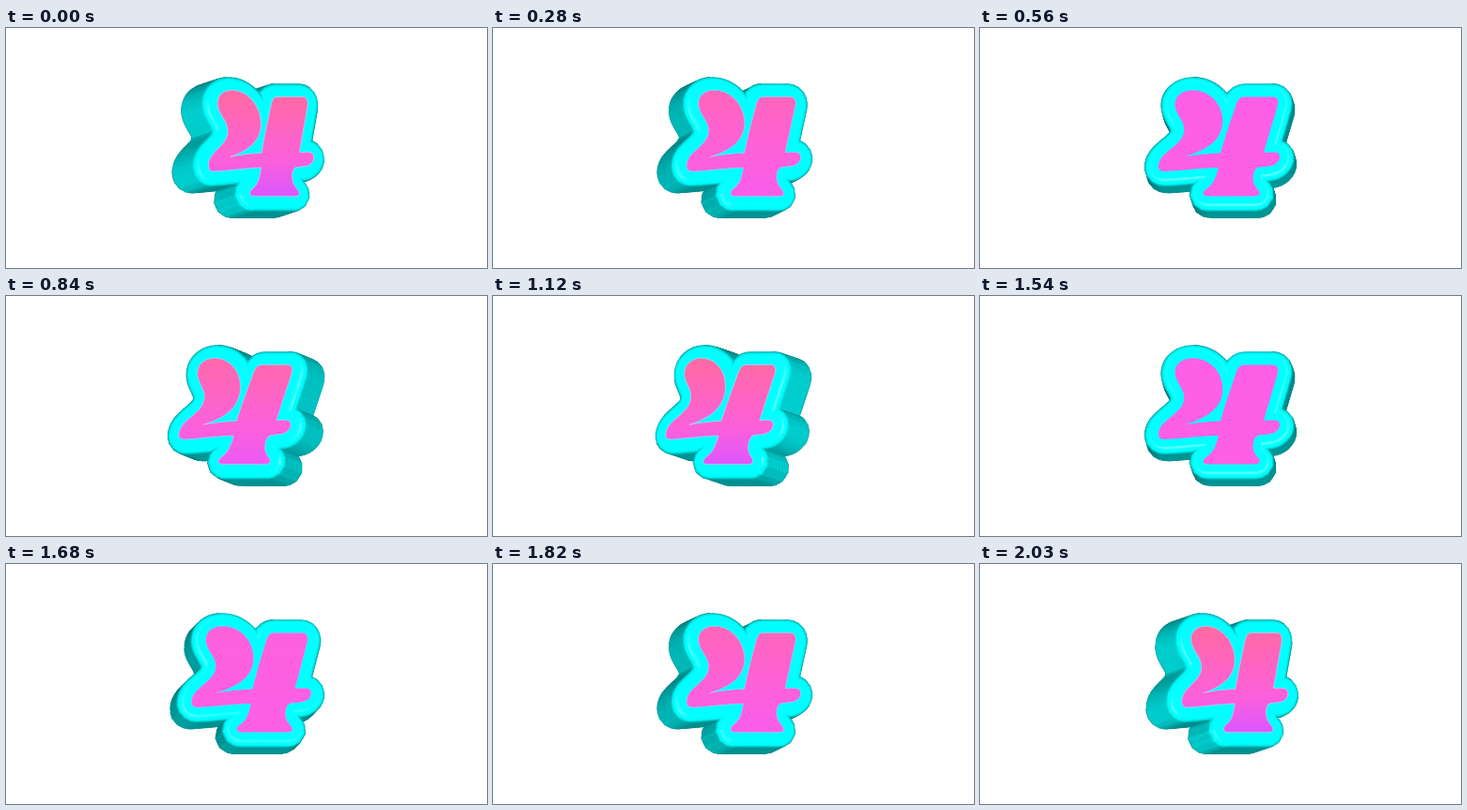
Write an HTML page with a canvas that moves like this. It is 512 by 256 pixels and loops after 2100 ms.

```html
<!DOCTYPE html>
<html lang="en">
<head>
<meta charset="utf-8">
<title>Swinging 4</title>
<style>
  html, body { margin: 0; width: 100%; height: 100%; overflow: hidden; background: #fff; }
  canvas { display: block; }
</style>
</head>
<body>
<canvas id="stage" width="512" height="256"></canvas>
<script>
const ctx = document.getElementById('stage').getContext('2d');
const LOOP = 2100, STEP = 70;
const SWING = 0.506;            // largest turn, radians
const TILT = 0.16;              // constant lean backwards
const CX = 256, CY = 127;
const FACE_Z = 29, BEVEL = 7, RIM = 8, SAMPLES = 360;
const sinT = Math.sin(TILT), cosT = Math.cos(TILT);

const GLYPH = `M226 67 C215 67 207 73 207 82 C207 92 217 99 217 109
  C217 120 207 126 199 133 C193 138 190 143 190 148 C190 152 192 153.5 197 153.5
  C212 153 235 150 254 149.5 C252 158 249 167 243 171 C240 173 238 175 238 177
  C238 179 240 180 243 180 H293 C297 180 298.5 178 298 176
  C297 173 292 170 291 163 C290.5 157 292 151 296 149.5
  C302 148 308 149 313 146.5 C318 144 320 140 319 136.5 C318 133 314 133 309 133
  L302 133.5 L316 85 C318 78 316 74 311 74 H282 C276 74 274 77 272 83
  C266 101 260 119 256 134 C242 134.5 230 136 217 138
  C238 132 258 122 258 100 C258 82 244 67 226 67 Z`;

// Centred outline points with outward normals
function sampleOutline() {
  const path = document.createElementNS('http://www.w3.org/2000/svg', 'path');
  path.setAttribute('d', GLYPH);
  const length = path.getTotalLength();
  const points = Array.from({ length: SAMPLES }, (_, i) => {
    const p = path.getPointAtLength(length * i / SAMPLES);
    return { x: p.x - 254.4, y: (p.y - 123) * 1.013 };
  });
  points.forEach((p, i) => {
    const a = points[(i + SAMPLES - 1) % SAMPLES], b = points[(i + 1) % SAMPLES];
    const d = Math.hypot(b.x - a.x, b.y - a.y) || 1;
    p.nx = -(b.y - a.y) / d;
    p.ny = (b.x - a.x) / d;
  });
  return points;
}

const outline = sampleOutline();
const shape = new Path2D();
outline.forEach(p => shape.lineTo(p.x, p.y));
shape.closePath();

// Side profile from back to front: rounded edge, straight wall, rounded edge
const ROUND = 5, SLICES = 14;
const wallZ = FACE_Z - BEVEL;
const profile = [];
for (let i = 0; i <= ROUND; i++) {
  const a = i / ROUND * Math.PI / 2;
  profile.push({ r: RIM + BEVEL * Math.sin(a), z: -wallZ - BEVEL * Math.cos(a) });
}
for (let i = 1; i <= SLICES; i++) {
  profile.push({ r: RIM + BEVEL, z: wallZ * (2 * i / SLICES - 1) });
}
for (let i = 1; i <= ROUND; i++) {
  const a = i / ROUND * Math.PI / 2;
  profile.push({ r: RIM + BEVEL * Math.cos(a), z: wallZ + BEVEL * Math.sin(a) });
}

const clamp = v => Math.max(0, Math.min(1, v));
const mix = (a, b, t) => `rgb(${a.map((v, i) => Math.round(v + (b[i] - v) * t))})`;

function cyan(facing, gloss = 0) {
  const f = Math.max(0, facing);
  const v = Math.round(Math.min(255, 122 + 175 * f));
  return `rgb(${Math.round(gloss * f ** 40)},${v},${v})`;
}

function setPlane(z, sinA, cosA) {
  ctx.setTransform(cosA, 0, sinT * sinA, cosT, CX + z * cosT * sinA, CY - z * sinT);
}

function drawSlab(z, r, color, sinA, cosA) {
  setPlane(z, sinA, cosA);
  ctx.fillStyle = ctx.strokeStyle = color;
  ctx.lineWidth = 2 * r;
  ctx.fill(shape);
  ctx.stroke(shape);
}

function drawBand(back, front, sinA, cosA) {
  const dr = front.r - back.r, dz = front.z - back.z, d = Math.hypot(dr, dz);
  const out = dz / d, fwd = -dr / d;
  const gloss = fwd > 0.01 ? 90 : 0;
  const ring = ({ r, z }) => outline.map(p => {
    const x = p.x + r * p.nx, y = p.y + r * p.ny;
    return [CX + x * cosA + (z * cosT + y * sinT) * sinA, CY + y * cosT - z * sinT];
  });
  const a = ring(back), b = ring(front);
  ctx.setTransform(1, 0, 0, 1, 0, 0);
  ctx.lineWidth = 0.6;
  outline.forEach((p, i) => {
    const depth = fwd * cosT + p.ny * out * sinT;
    const facing = depth * cosA - p.nx * out * sinA;
    if (facing <= 0) return;
    const j = (i + 1) % SAMPLES;
    ctx.fillStyle = ctx.strokeStyle = cyan(facing, gloss);
    ctx.beginPath();
    [a[i], a[j], b[j], b[i]].forEach(q => ctx.lineTo(q[0], q[1]));
    ctx.closePath();
    ctx.fill();
    ctx.stroke();
  });
  // Slightly inset, so that the slice edges do not stripe the wall
  drawSlab(front.z, front.r - 0.5, cyan(fwd * cosT * cosA), sinA, cosA);
}

function drawFace(turn, sinA, cosA) {
  const k = Math.abs(turn);
  const pink = [255, 95, 231];
  const fill = ctx.createLinearGradient(0, -57, 0, 58);
  fill.addColorStop(0, mix(pink, [255, 106, 162], clamp((k - 0.2) / 0.7)));
  fill.addColorStop(0.65, mix(pink, [253, 96, 217], k));
  fill.addColorStop(1, mix(pink, [218, 86, 255], clamp((k - 0.6) / 0.4)));
  setPlane(FACE_Z, sinA, cosA);
  ctx.fillStyle = fill;
  ctx.fill(shape);
  ctx.strokeStyle = `rgba(240,195,245,${0.8 * k})`;
  ctx.lineWidth = 0.8;
  ctx.stroke(shape);
}

function draw(time) {
  const turn = Math.cos(2 * Math.PI * time / LOOP);
  const sinA = Math.sin(SWING * turn), cosA = Math.cos(SWING * turn);
  ctx.setTransform(1, 0, 0, 1, 0, 0);
  ctx.clearRect(0, 0, 512, 256);
  ctx.lineJoin = 'round';
  for (let i = 1; i < profile.length; i++) drawBand(profile[i - 1], profile[i], sinA, cosA);
  drawSlab(FACE_Z, RIM, cyan(1), sinA, cosA);
  drawFace(turn, sinA, cosA);
}

let shown = -1;
function tick() {
  const step = Math.floor(performance.now() % LOOP / STEP);
  if (step !== shown) {
    shown = step;
    draw(step * STEP);
  }
  requestAnimationFrame(tick);
}
tick();
</script>
</body>
</html>
```
